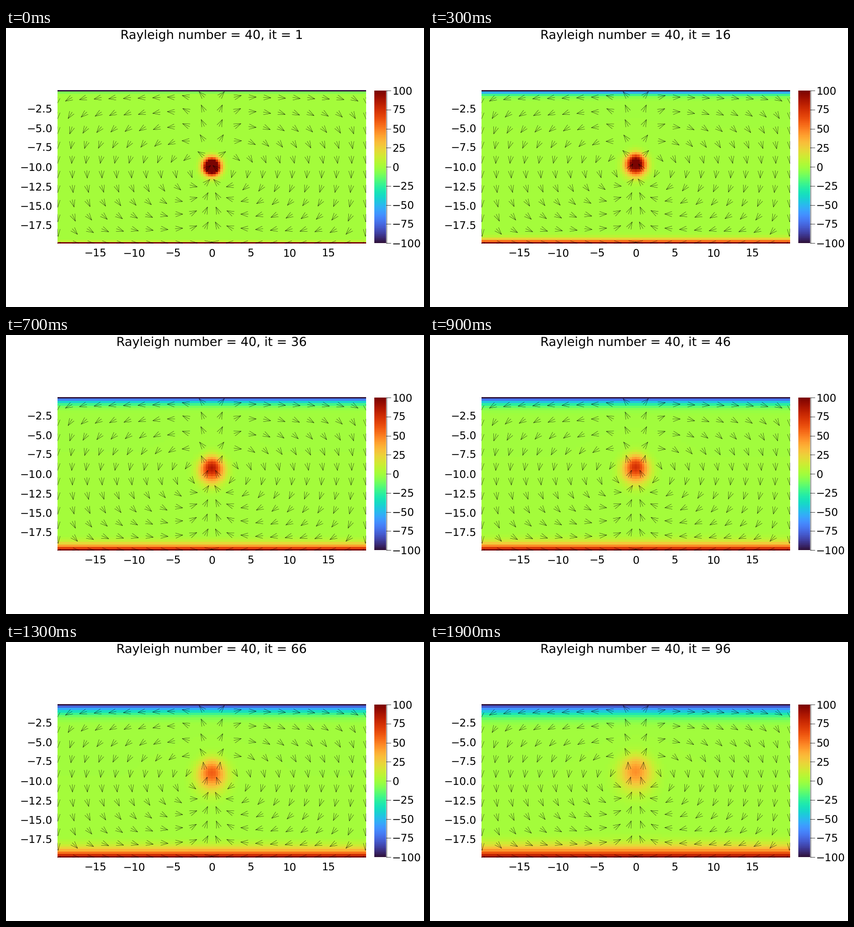
Write a matplotlib script that moves like this. It is 917 px wide and 611 px high and loops after 2000 ms.

```python
import numpy as np
import matplotlib.pyplot as plt
from matplotlib.animation import FuncAnimation
from matplotlib.collections import LineCollection

W, H, DPI = 917, 611, 64
PT = 72 / DPI                                # points per pixel
LEFT, RIGHT, TOP, BOTTOM = 113.0, 789.7, 136.0, 471.5
UNIT = 17.04                                 # pixels per length unit

# porous convection: domain, grid and rates per time step
LX, LY, NX = 40.0, 20.0, 127
NY = int(np.ceil(NX * LY / LX))
DX, DY = LX / NX, LY / NY
DELTA_T = 200.0
DIFF = 0.080 * DY * DY                       # diffusivity * dt
ADV = 0.043 / (DELTA_T / 2)                  # dt / porosity
FRAMES, EVERY, STRIDE = 20, 5, 6

xc = -LX / 2 + DX * (np.arange(NX) + 0.5)
yc = -LY + DY * (np.arange(NY) + 0.5)


def cosine_basis(n, h):
    """Orthonormal eigenvectors and eigenvalues of the no-flux Laplacian."""
    k = np.arange(n)
    basis = np.cos(np.pi * np.outer(k, k + 0.5) / n) * np.sqrt(2 / n)
    basis[0] /= np.sqrt(2)
    return basis, (2 * np.cos(np.pi * k / n) - 2) / h ** 2


BX, EX = cosine_basis(NX, DX)
BY, EY = cosine_basis(NY, DY)
EIG = EX[:, None] + EY[None, :]
EIG[0, 0] = 1.0


def darcy_flux(T):
    """Buoyant flux on the cell faces, free of divergence."""
    qx = np.zeros((NX + 1, NY))
    qy = np.zeros((NX, NY + 1))
    qy[:, 1:-1] = (T[:, 1:] + T[:, :-1]) / 2
    spec = BX @ (np.diff(qy, axis=1) / DY) @ BY.T / EIG
    spec[0, 0] = 0.0
    P = BX.T @ spec @ BY
    qx[1:-1] = -np.diff(P, axis=0) / DX
    qy[:, 1:-1] -= np.diff(P, axis=1) / DY
    return qx, qy


def gradients(T):
    return np.diff(T, axis=0)[:, 1:-1] / DX, np.diff(T, axis=1)[1:-1] / DY


def step(T, qx, qy):
    """Diffuse, then advect upwind."""
    T = T.copy()
    gx, gy = gradients(T)
    T[1:-1, 1:-1] += DIFF * (np.diff(gx, axis=0) / DX + np.diff(gy, axis=1) / DY)
    gx, gy = gradients(T)
    T[1:-1, 1:-1] -= ADV * (
        np.maximum(qx[1:-2, 1:-1], 0) * gx[:-1]
        + np.minimum(qx[2:-1, 1:-1], 0) * gx[1:]
        + np.maximum(qy[1:-1, 1:-2], 0) * gy[:, :-1]
        + np.minimum(qy[1:-1, 2:-1], 0) * gy[:, 1:])
    T[0], T[-1] = T[1], T[-2]
    return T


def arrows(qx, qy):
    """Unit arrows: a shaft and an open head for every sampled cell."""
    u = ((qx[1:] + qx[:-1]) / 2)[::STRIDE, ::STRIDE].ravel()
    v = ((qy[:, 1:] + qy[:, :-1]) / 2)[::STRIDE, ::STRIDE].ravel()
    d = np.stack([u, v], axis=1) / (np.hypot(u, v)[:, None] + 1e-12)
    side = np.stack([-d[:, 1], d[:, 0]], axis=1)
    X, Y = np.meshgrid(xc[::STRIDE], yc[::STRIDE], indexing="ij")
    start = np.stack([X.ravel(), Y.ravel()], axis=1)
    tip = start + d
    back = tip - 0.92 * d
    shafts = np.stack([start, tip], axis=1)
    heads = np.stack([back + 0.335 * side, tip, back - 0.335 * side], axis=1)
    return list(shafts) + list(heads)


def simulate():
    T = DELTA_T * np.exp(-xc[:, None] ** 2 - (yc[None, :] + LY / 2) ** 2)
    T[:, 0], T[:, -1] = DELTA_T / 2, -DELTA_T / 2
    T[0], T[-1] = T[1], T[-2]
    states = []
    for it in range(1, (FRAMES - 1) * EVERY + 2):
        qx, qy = darcy_flux(T)
        T = step(T, qx, qy)
        if it % EVERY == 1:
            states.append((it, T.T, arrows(qx, qy)))
    return states


states = simulate()

plt.rcParams["font.family"] = "DejaVu Sans"
plt.rcParams["text.hinting"] = "none"
fig = plt.figure(figsize=(W / DPI, H / DPI), dpi=DPI, facecolor="white")

# page in pixel coordinates: labels and colour bar
page = fig.add_axes([0, 0, 1, 1])
page.imshow(np.linspace(1, 0, 256)[:, None], cmap="turbo", vmin=0, vmax=1,
            extent=(808, 834, 471, 137), aspect="auto", interpolation="bilinear")
page.set_xlim(0, W)
page.set_ylim(H, 0)
page.axis("off")


def label(x, y, text, ha, size=23.2):
    return page.text(x, y, text, ha=ha, va="baseline", fontsize=size * PT, color="black")


def line(xs, ys, color="black", width=0.8):
    page.plot(xs, ys, color=color, lw=width * PT)


def number(value, digits=0):
    return f"{value:.{digits}f}".replace("-", "\u2212")


for v in range(-15, 16, 5):
    label(451.4 + UNIT * v, 500.5, number(v), "center")
for k in range(1, 8):
    v = -2.5 * k
    label(101.5, 304.2 - UNIT * (v + 10) + 8.5, number(v, 1), "right")
for v in range(-100, 101, 25):
    y = 304 - 1.67 * v
    line([834, 843.5], [y, y])
    label(847, y + 8.3, number(v), "left")
line([834.5, 834.5], [137, 471])
line([112.5, 112.5], [TOP, BOTTOM], "0.4", 1)
title = label(451.3, 24, "", "center", 27.25)

# temperature field, clipped to the cell centres at the rim
ax = fig.add_axes([LEFT / W, 1 - BOTTOM / H, (RIGHT - LEFT) / W, (BOTTOM - TOP) / H])
heat = ax.imshow(states[0][1], origin="lower", extent=(-LX / 2, LX / 2, -LY, 0),
                 cmap="turbo", vmin=-100, vmax=100, aspect="auto",
                 interpolation="nearest")
quiver = LineCollection([], colors="black", linewidths=0.5 * PT)
ax.add_collection(quiver)
ax.set_xlim(xc[0], xc[-1])
ax.set_ylim(yc[0], yc[-1])
ax.axis("off")


def draw(i):
    it, T, segments = states[i]
    title.set_text(f"Rayleigh number = 40, it = {it}")
    heat.set_data(T)
    quiver.set_segments(segments)
    return title, heat, quiver


anim = FuncAnimation(fig, draw, frames=FRAMES, init_func=lambda: draw(0),
                     interval=100, repeat=True, repeat_delay=0, blit=False)
plt.show()
```
